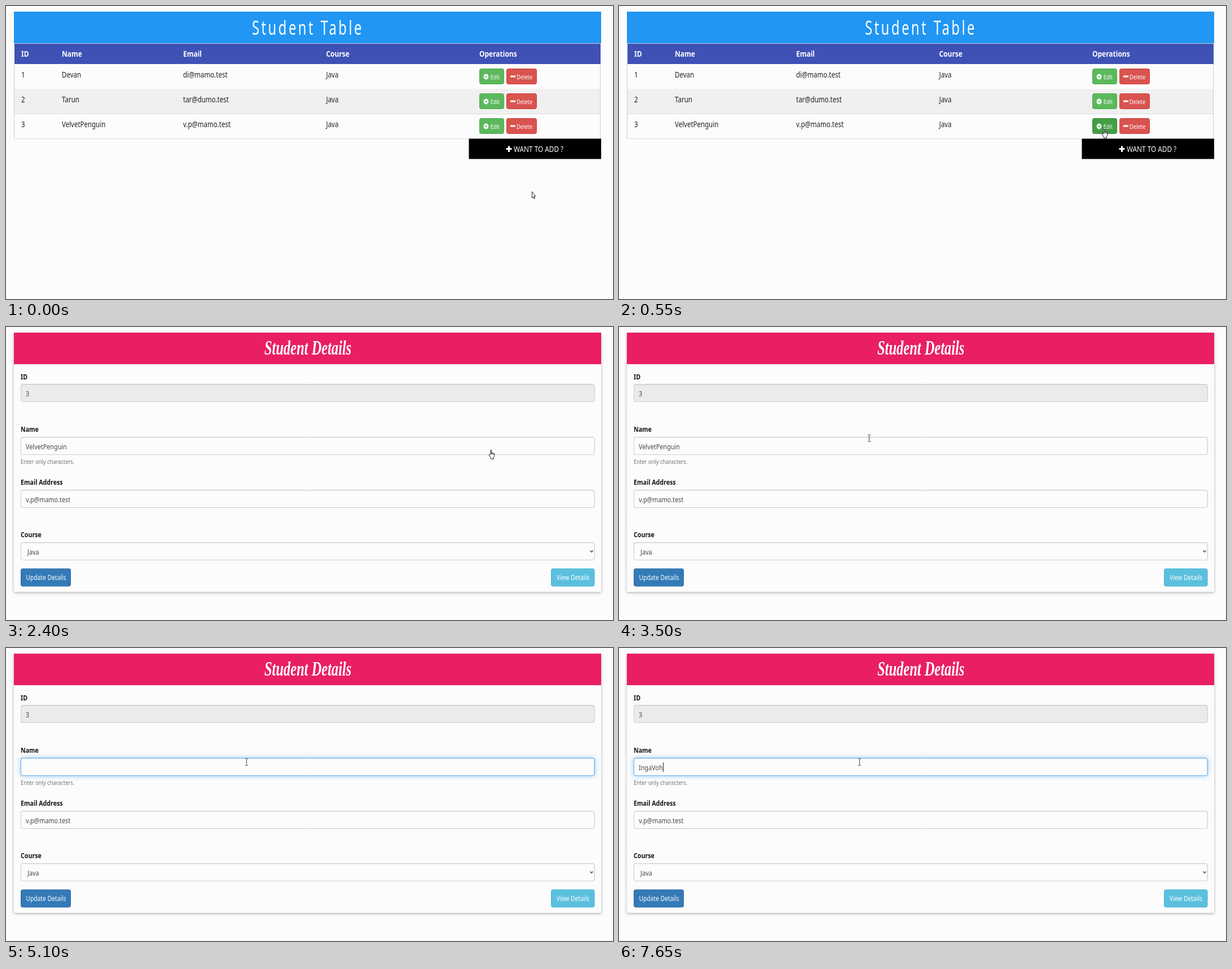
Animation of 1076x520 px, one loop 8000 ms. Source, as an HTML page with a canvas:

```html
<!DOCTYPE html>
<html lang="en">
<head>
<meta charset="utf-8">
<title>Student Table</title>
<style>
html, body { margin: 0; width: 100%; height: 100%; overflow: hidden; background: #fcfcfc; }
canvas { display: block; }
</style>
</head>
<body>
<canvas id="stage" width="1076" height="520"></canvas>
<script>
const ctx = document.getElementById('stage').getContext('2d');
const LOOP = 8000, TICK = 50;
const PAGE = '#fcfcfc';
const SANS = '"Noto Sans", "Open Sans", sans-serif';
const SERIF = '"Liberation Serif", serif';
const SQUASH = 0.82, CONDENSED = 0.68;

const students = [
  ['1', 'Devan', 'di@mamo.test', 'Java'],
  ['2', 'Tarun', 'tar@dumo.test', 'Java'],
  ['3', 'VelvetPenguin', 'v.p@mamo.test', 'Java'],
];
const columns = [[27, 'ID'], [99, 'Name'], [314, 'Email'], [567.5, 'Course'], [839, 'Operations']];
const newName = 'IngaVoh';
const keyTimes = [5300, 6000, 6300, 6550, 7200, 7450, 7650];
const caretSpans = [[4350, 4800], [5300, 5800], [6000, 7050], [7200, LOOP]];

const clamp = v => Math.max(0, Math.min(1, v));
const ease = v => v * v * (3 - 2 * v);
const lerp = (a, b, p) => a + (b - a) * p;
const inside = (p, x0, y0, x1, y1) => p.x >= x0 && p.x < x1 && p.y >= y0 && p.y < y1;

function rect(x, y, w, h, color) {
  ctx.fillStyle = color;
  ctx.fillRect(x, y, w, h);
}

function text(str, x, y, size, color, { weight = 400, font = SANS, squash = SQUASH, spacing = 0 } = {}) {
  ctx.save();
  ctx.translate(x, y);
  ctx.scale(squash, 1);
  ctx.font = `${weight} ${size}px ${font}`;
  ctx.letterSpacing = spacing + 'px';
  ctx.fillStyle = color;
  ctx.fillText(str, 0, 0);
  const width = ctx.measureText(str).width * squash;
  ctx.restore();
  return width;
}

function box(x, y, w, h, fill, border, radius = 3) {
  ctx.beginPath();
  ctx.roundRect(x + 0.5, y + 0.5, w - 1, h - 1, radius);
  ctx.fillStyle = fill;
  ctx.fill();
  ctx.strokeStyle = border;
  ctx.lineWidth = 1;
  ctx.stroke();
}

function gear(x, y) {
  ctx.save();
  ctx.translate(x, y);
  ctx.scale(0.86, 1);
  ctx.fillStyle = '#fff';
  for (let i = 0; i < 4; i++) {
    ctx.fillRect(-1.3, -5.2, 2.6, 10.4);
    ctx.rotate(Math.PI / 4);
  }
  ctx.beginPath();
  ctx.arc(0, 0, 2.9, 0, 7);
  ctx.lineWidth = 2.4;
  ctx.strokeStyle = '#fff';
  ctx.stroke();
  ctx.restore();
}

function gearButton(y, state) {
  const looks = {
    idle: ['#5cb85c', '#4cae4c'],
    hover: ['#449d44', '#398439'],
    down: ['#398439', '#255625'],
  };
  box(839, y, 44, 28, ...looks[state]);
  if (state === 'down') rect(840, y + 1, 42, 2, 'rgba(0,0,0,.12)');
  // A ring rather than a disc keeps the hub open.
  gear(851, y + 14.5);
  ctx.beginPath();
  ctx.arc(851, y + 14.5, 1.5, 0, 7);
  ctx.fillStyle = looks[state][0];
  ctx.fill();
  text('Edit', 858.7, y + 18.5, 11.1, '#fff');
}

function drawTable(t, mouse) {
  rect(14, 10, 1041, 56, '#2196f3');
  text('Student Table', 436, 51, 35, '#fff', { weight: 500, squash: CONDENSED, spacing: 5.1 });
  rect(14, 66, 1040, 1, '#ccc');
  rect(15, 67, 1039, 36, '#3f51b5');
  for (const [x, label] of columns) text(label, x, 90, 14.6, '#fff', { weight: 700 });

  students.forEach((row, i) => {
    const y = 103 + i * 44;
    if (i % 2) rect(15, y, 1038, 44, '#f0f0f0');
    rect(14, y + 44, 1040, 1, '#ddd');
    row.forEach((cell, c) => text(cell, columns[c][0], y + 24, 14, '#222'));
    const over = inside(mouse, 839, y + 8, 883, y + 36);
    gearButton(y + 8, over ? (t >= 1950 && t < 2050 ? 'down' : 'hover') : 'idle');
    box(887, y + 8, 54, 28, '#d9534f', '#d43f3a');
    rect(894, y + 20.5, 9, 3, '#fff');
    text('Delete', 905, y + 26.5, 11.3, '#fff');
  });
  rect(14, 103, 1, 133, '#ccc');
  rect(1053, 103, 1, 133, '#ccc');

  const over = inside(mouse, 820, 236, 1055, 272);
  const ink = over ? '#000' : '#fff';
  rect(820.5, 235.5, 234.5, 36, over ? '#ccc' : '#000');
  rect(886.5, 252, 10, 3.2, ink);
  rect(890, 248.5, 3, 10.5, ink);
  text('WANT TO ADD ?', 900, 259, 14.4, ink);
}

function field(y, h, value, x = 35, fill = PAGE, focus = 0) {
  const tone = (a, b) => Math.round(lerp(a, b, focus));
  const border = `rgb(${tone(204, 102)},${tone(204, 175)},${tone(204, 233)})`;
  ctx.save();
  if (focus) {
    ctx.shadowColor = `rgba(102,175,233,${0.6 * focus})`;
    ctx.shadowBlur = 8;
  }
  box(26, y, 1017.5, h, fill, border);
  ctx.restore();
  box(26, y, 1017.5, h, fill, border);
  rect(28, y + 1, 1013, 1, 'rgba(0,0,0,.06)');
  return text(value, x, y + 22, 13.2, '#484848');
}

function drawForm(t) {
  ctx.save();
  ctx.shadowColor = 'rgba(0,0,0,.3)';
  ctx.shadowBlur = 5;
  ctx.shadowOffsetY = 1.5;
  rect(14, 10, 1041, 460, PAGE);
  ctx.restore();
  rect(14, 10, 1041, 56, '#e91e63');
  text('Student Details', 458, 49, 36, '#fff', { weight: 'italic 700', font: SERIF, squash: CONDENSED });

  const labels = [['ID', 93], ['Name', 186], ['Email Address', 280], ['Course', 373]];
  for (const [label, y] of labels) text(label, 26, y, 13, '#151515', { weight: 700 });

  const typed = keyTimes.filter(k => t >= k).length;
  const name = t < 5100 ? students[2][1] : newName.slice(0, typed);
  const focus = t < 4350 ? 0 : clamp((t - 4300) / 200);
  field(101, 32, '3', 35, '#ebebeb');
  const width = field(195, 32, name, 35, PAGE, focus);
  if (caretSpans.some(([a, b]) => t >= a && t < b)) rect(Math.round(35 + width), 203, 1, 17, '#222');
  text('Enter only characters.', 26, 243, 11.4, '#737373');
  field(289, 32, students[2][2]);
  field(382, 32, 'Java', 38);

  ctx.beginPath();
  ctx.moveTo(1035.5, 396.5);
  ctx.lineTo(1038, 399.5);
  ctx.lineTo(1040.5, 396.5);
  ctx.strokeStyle = '#444';
  ctx.lineWidth = 1.2;
  ctx.stroke();

  box(26, 428.5, 89, 32, '#337ab7', '#2e6da4');
  text('Update Details', 35.5, 449, 12.5, '#fff', { weight: 500 });
  box(966, 428.5, 77.5, 32, '#5bc0de', '#46b8da');
  text('View Details', 976, 449, 12.5, '#fff', { weight: 500 });
}

const arrowPath = new Path2D('M.5 .5V11.5L2.6 9.3L4.1 13.2L5.6 12.4L4.1 8.8H6.9Z');
const handPath = new Path2D('M2.9 10V1.6Q3.7 -.1 4.7 1.6V6.2Q5.9 5.2 6.6 6.7Q7.7 5.9 8.3 7.3Q9.6 6.8 9.7 8.4V12.2L8.5 14.6V17.2H3.5V15.2L.7 11.2Q-.2 9.2 1.5 9.1Z');
const handLines = new Path2D('M4.7 6V9M6.6 6.7V9.2M8.3 7.3V9.4');

function drawCursor({ x, y }, kind) {
  ctx.save();
  ctx.lineWidth = 1;
  ctx.strokeStyle = '#222';
  ctx.fillStyle = '#fff';
  if (kind === 'beam') {
    ctx.translate(Math.round(x), Math.round(y));
    rect(0, -5, 1, 11, '#444');
    rect(-2, -6, 2, 1, '#444');
    rect(1, -6, 2, 1, '#444');
    rect(-2, 6, 2, 1, '#444');
    rect(1, 6, 2, 1, '#444');
  } else {
    const hand = kind === 'hand';
    ctx.translate(x - (hand ? 4 : 0), y);
    const shape = hand ? handPath : arrowPath;
    ctx.fill(shape);
    ctx.stroke(shape);
    if (hand) ctx.stroke(handLines);
  }
  ctx.restore();
}

function mouseAt(t) {
  if (t < 2800) {
    const p = t < 150 ? 0 : ease(clamp((t - 100) / 450));
    return { x: lerp(932, 860, p), y: lerp(329, 217, p) };
  }
  const p = ease(clamp((t - 2750) / 850));
  return { x: lerp(860, 426, p), y: lerp(217, 202, p) - 150 * p * (1 - p) };
}

function cursorKind(t, mouse) {
  if (t >= 2800) return inside(mouse, 26, 195, 1043, 227) ? 'beam' : 'arrow';
  const link = t >= 2400 || inside(mouse, 839, 199, 883, 227) || inside(mouse, 820, 236, 1055, 272);
  return link ? 'hand' : 'arrow';
}

function draw(now) {
  const t = Math.floor((now % LOOP) / TICK) * TICK;
  const mouse = mouseAt(t);
  rect(0, 0, 1076, 520, PAGE);
  if (t < 2400) drawTable(t, mouse);
  else drawForm(t);
  drawCursor(mouse, cursorKind(t, mouse));
}

const start = performance.now();
function loop() {
  draw(performance.now() - start);
  requestAnimationFrame(loop);
}
loop();
</script>
</body>
</html>
```
